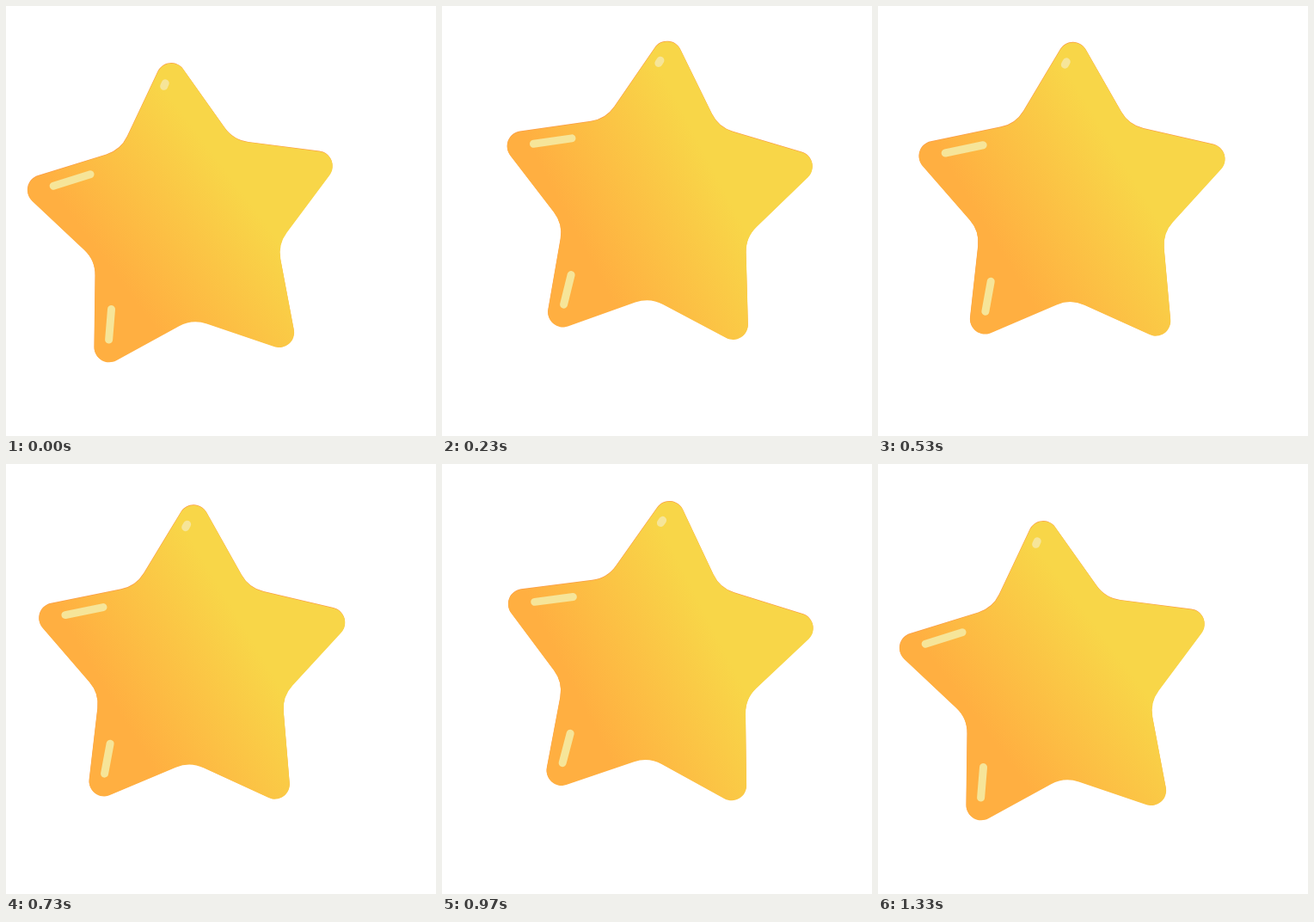
Write an HTML page with a canvas that moves like this. It is 500x500 px and loops after 1410 ms.

```html
<!DOCTYPE html>
<html>
<head>
<meta charset="utf-8">
<style>
  html, body { margin: 0; width: 100%; height: 100%; overflow: hidden; background: #fff; }
  canvas { display: block; width: 500px; height: 500px; }
</style>
</head>
<body>
<canvas id="stage" width="500" height="500"></canvas>
<script>
const ctx = document.getElementById('stage').getContext('2d');
const LOOP = 1410, LAST_STEP = 40;

// [step, value] pairs, eased in and out between neighbours
const xKeys = [[0, 207], [9.5, 258.3], [19.8, 210.3], [29.5, 250.1], [30, 250.1], [40, 207]];
const tiltKeys = [[0, -5], [8.5, 5], [19, -0.5], [28, 5], [30, 5], [40, -5]];

// Each swing follows an arc: low end, high end, and how sharply it bends
const arcs = [
  { until: 9.5,  low: [207, 252.3],   high: [258.3, 226],   bend: 1.8 },
  { until: 19.8, low: [210.3, 241.2], high: [258.3, 226],   bend: 4.7 },
  { until: 29.5, low: [210.3, 241.2], high: [250.1, 229.2], bend: 6.3 },
  { until: 40,   low: [207, 252.3],   high: [250.1, 229.8], bend: 1.8 }
];

function keyed(keys, step) {
  const i = Math.max(1, keys.findIndex(k => k[0] >= step));
  const [t0, a] = keys[i - 1], [t1, b] = keys[i];
  const u = (step - t0) / (t1 - t0);
  return a + (b - a) * u * u * (3 - 2 * u);
}

function arcHeight(step, x) {
  const { low, high, bend } = arcs.find(a => step <= a.until);
  const rest = Math.max(0, (high[0] - x) / (high[0] - low[0]));
  return high[1] + (low[1] - high[1]) * rest ** bend;
}

function starPath() {
  const outer = 203.2, inner = 111.9;
  const corner = i => {
    const r = i % 2 ? inner : outer, a = i * Math.PI / 5;
    return [r * Math.sin(a), -r * Math.cos(a)];
  };
  const path = new Path2D();
  const [ax, ay] = corner(9), [bx, by] = corner(0);
  path.moveTo((ax + bx) / 2, (ay + by) / 2);
  for (let i = 0; i < 10; i++) {
    path.arcTo(...corner(i), ...corner(i + 1), i % 2 ? 40 : 17.3);
  }
  path.closePath();
  return path;
}

const star = starPath();
const body = ctx.createLinearGradient(-85, 53, 64, -40);
body.addColorStop(0, '#ffaf41');
body.addColorStop(1, '#f8d648');

const shines = [
  [-7.5, -163.8, -9.4, -160.4],
  [-147.5, -56.2, -103.6, -65.9],
  [-92.9, 92.5, -98.9, 127.6]
];

function draw(step) {
  const x = keyed(xKeys, step);
  ctx.setTransform(1, 0, 0, 1, 0, 0);
  ctx.fillStyle = '#fff';
  ctx.fillRect(0, 0, 500, 500);
  ctx.translate(x, arcHeight(step, x));
  ctx.rotate(keyed(tiltKeys, step) * Math.PI / 180);

  // darker rim along the upper edges
  ctx.save();
  ctx.translate(-0.2, -0.7);
  ctx.fillStyle = '#fa9c45';
  ctx.fill(star);
  ctx.restore();

  ctx.fillStyle = body;
  ctx.fill(star);

  ctx.strokeStyle = '#f6e599';
  ctx.lineWidth = 9;
  ctx.lineCap = 'round';
  for (const [x0, y0, x1, y1] of shines) {
    ctx.beginPath();
    ctx.moveTo(x0, y0);
    ctx.lineTo(x1, y1);
    ctx.stroke();
  }
}

function tick() {
  // 30 steps a second, on a clock of 10 ms
  const ticks = Math.floor(performance.now() % LOOP / 10);
  draw(Math.min(LAST_STEP, Math.floor(ticks * 0.3 + 0.15)));
  requestAnimationFrame(tick);
}
tick();
</script>
</body>
</html>
```
